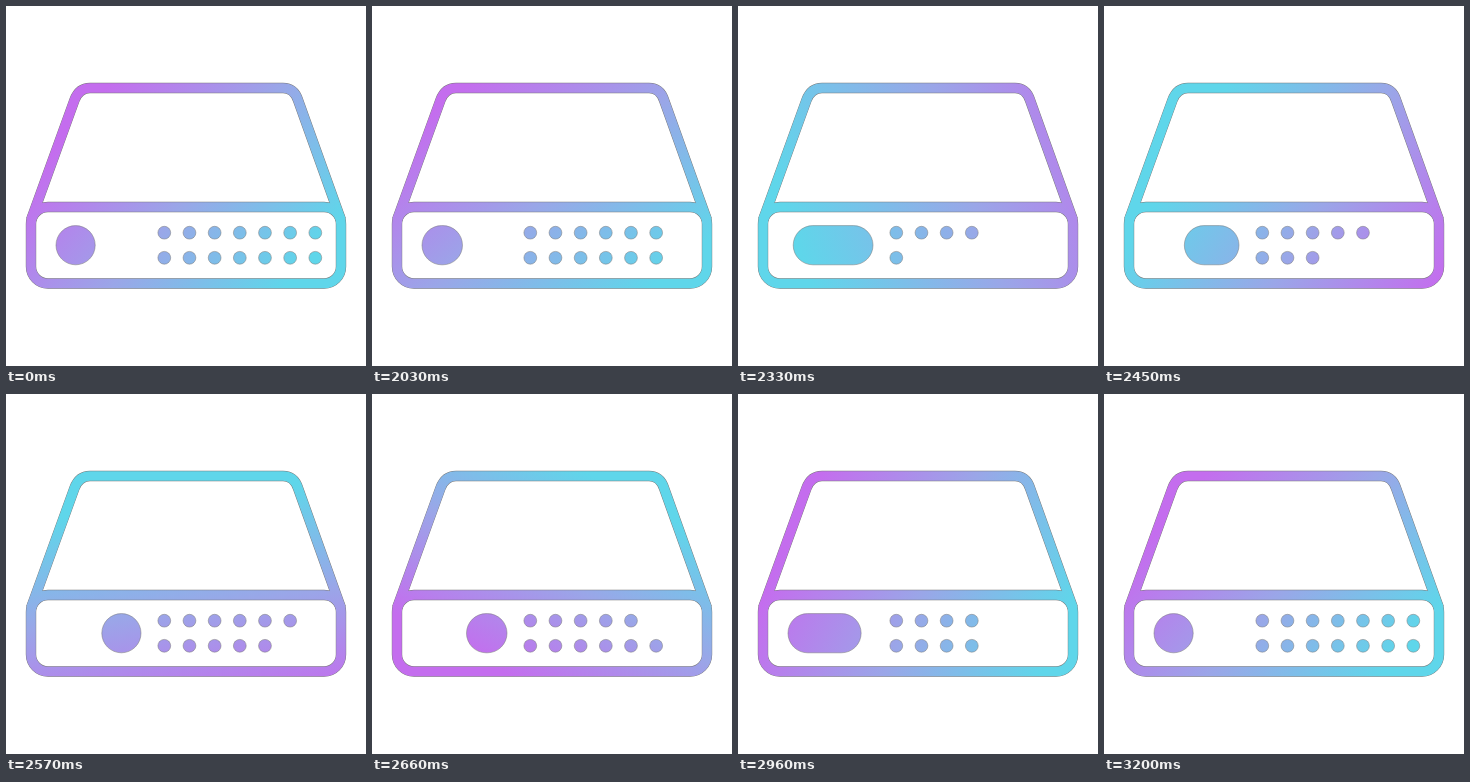
Animation of 360 by 360 pixels, one loop 3.23 s. Source, as an HTML page:

```html
<!DOCTYPE html>
<html lang="en">
<head>
<meta charset="utf-8">
<title>Server drive</title>
<style>
  html, body { margin: 0; height: 100%; overflow: hidden; background: #fff; }
  svg { display: block; width: 100vw; height: 100vh; }
</style>
</head>
<body>
<svg viewBox="0 0 360 360">
  <defs>
    <linearGradient id="sweep" gradientUnits="userSpaceOnUse">
      <stop offset="0" stop-color="#c46dee"/>
      <stop offset=".5" stop-color="#9aa6e8"/>
      <stop offset="1" stop-color="#5fd6ea"/>
    </linearGradient>
    <g id="frame" fill="none">
      <path d="M25 214L68.5 94Q73 82 84 82H277Q288 82 292 94L335 214"/>
      <rect x="25" y="201" width="310" height="76.5" rx="17"/>
    </g>
  </defs>
  <use href="#frame" stroke="#777" stroke-width="10.4"/>
  <use href="#frame" stroke="url(#sweep)" stroke-width="9.6"/>
  <g id="lights" fill="url(#sweep)" stroke="#777" stroke-width=".5">
    <rect id="pill" y="219.6" height="39.2" rx="19.6"/>
  </g>
</svg>
<script>
const LOOP = 3230, START = 2030, STEP = 30, COLUMNS = 7;

// time, gradient angle, gradient offset at the centre, gradient length, lit dots above, below
const KEYS = [
  [2000, 40, .47, 265, 7, 7],
  [2330, 160, .63, 360, 4.2, 1.4],
  [2570, 262, .66, 215, 6.4, 5.5],
  [2750, 335, .36, 215, 5.4, 6.5],
  [2960, 385, .46, 285, 4.4, 4.4],
  [3200, 400, .47, 265, 7, 7]
];

const sweep = document.getElementById('sweep');
const pill = document.getElementById('pill');
const lights = document.getElementById('lights');

const set = (node, attrs) => {
  for (const name in attrs) node.setAttribute(name, attrs[name]);
};

const rows = [226.7, 251.8].map(cy => Array.from({ length: COLUMNS }, (_, i) => {
  const dot = document.createElementNS('http://www.w3.org/2000/svg', 'circle');
  set(dot, { cx: 158.3 + i * 25.17, cy, r: 6.4 });
  return lights.appendChild(dot);
}));

// smooth 300 ms move from 0 to 1
function move(t, start) {
  const p = Math.min(1, Math.max(0, (t - start) / 300));
  return p * p * (3 - 2 * p);
}

function sample(t) {
  const i = Math.max(1, KEYS.findIndex(key => key[0] >= t));
  const a = KEYS[i - 1], b = KEYS[i];
  const p = (t - a[0]) / (b[0] - a[0]);
  return a.map((v, k) => v + (b[k] - v) * p);
}

function draw(ms) {
  const t = ms < START ? KEYS[0][0] : START + Math.floor((ms - START) / STEP) * STEP;
  const [, angle, offset, length, ...counts] = sample(t);

  const dx = Math.cos(angle * Math.PI / 180) * length;
  const dy = Math.sin(angle * Math.PI / 180) * length;
  const x1 = 180 - dx * offset, y1 = 180 - dy * offset;
  set(sweep, { x1, y1, x2: x1 + dx, y2: y1 + dy });

  const left = 50 + 45.8 * (move(t, 2267) - move(t, 2630));
  const right = 89.2 + 45.8 * (move(t, 2000) - move(t, 2860));
  set(pill, { x: left, width: right - left });

  rows.forEach((row, r) => row.forEach((dot, i) => {
    dot.style.display = i < Math.floor(counts[r] + 1e-6) ? '' : 'none';
  }));
}

function tick() {
  draw(performance.now() % LOOP);
  requestAnimationFrame(tick);
}
tick();
</script>
</body>
</html>
```
